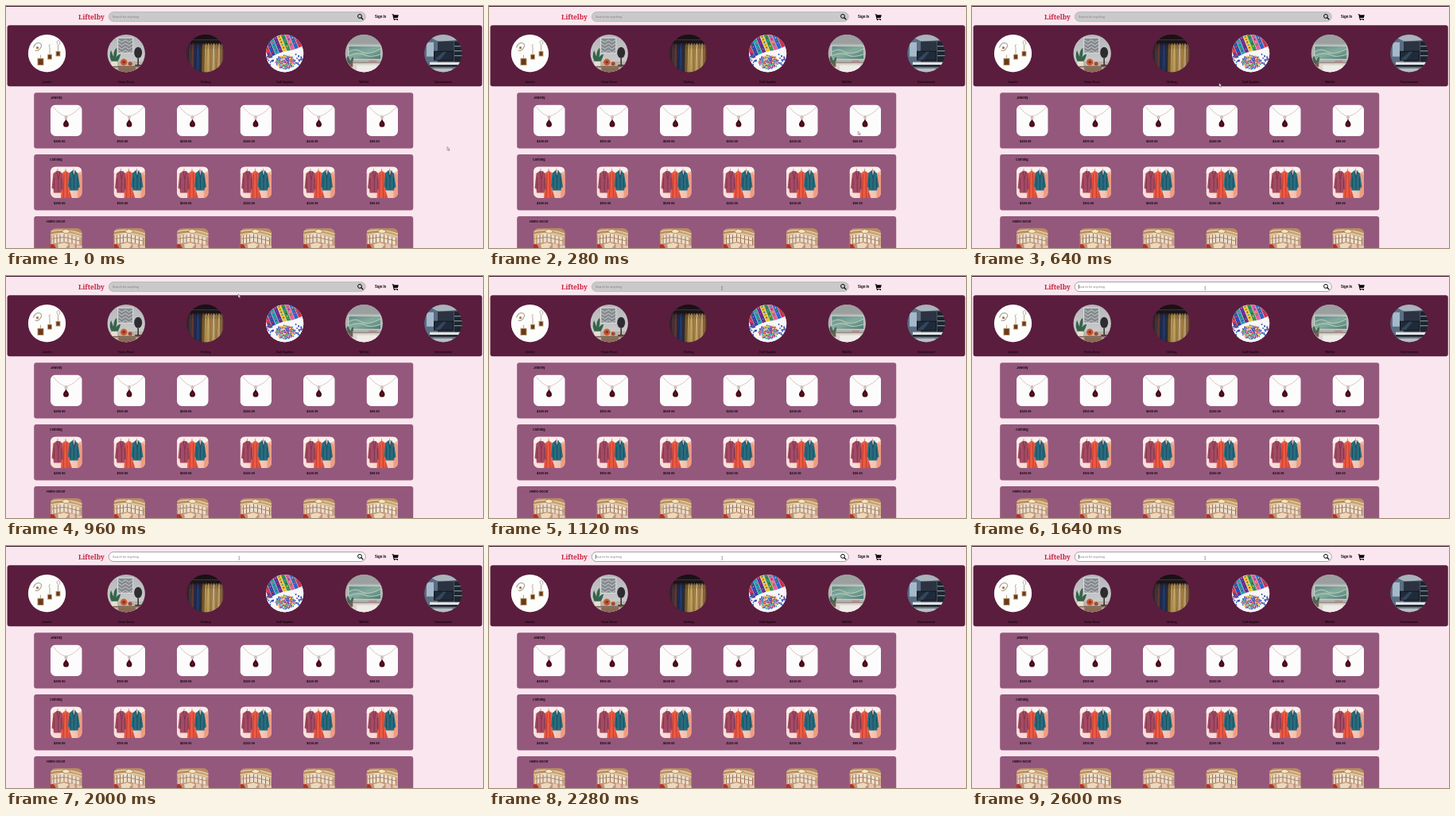
An HTML page for the animation above (2.68 s loop, 600 px wide and 305 px high).

```html
<!DOCTYPE html>
<html lang="en">
<head>
<meta charset="utf-8">
<title>Shop page</title>
<style>
html, body { margin: 0; width: 100%; height: 100%; overflow: hidden; background: #f9e6ee; }
svg { display: block; width: 600px; height: 305px; }
text { font-family: Inter, "Open Sans", sans-serif; }
.b { font-weight: 700; }
</style>
</head>
<body>
<svg id="stage" viewBox="0 0 600 305" xmlns="http://www.w3.org/2000/svg">
  <defs>
    <clipPath id="disc"><circle r="23.7"/></clipPath>
    <clipPath id="card"><rect width="39.5" height="39.5" rx="6.5"/></clipPath>
    <linearGradient id="wall" x2="0" y2="1"><stop stop-color="#b4b6ba"/><stop offset="1" stop-color="#d3d1cf"/></linearGradient>
    <linearGradient id="sea" x2="1" y2="1"><stop stop-color="#5f8984"/><stop offset=".5" stop-color="#86ab9f"/><stop offset="1" stop-color="#47786f"/></linearGradient>
    <linearGradient id="shade" x2="0" y2="1"><stop stop-color="#120c10" stop-opacity=".8"/><stop offset=".4" stop-color="#120c10" stop-opacity=".1"/><stop offset="1" stop-color="#120c10" stop-opacity=".2"/></linearGradient>
    <linearGradient id="peach"><stop stop-color="#f8e2de"/><stop offset=".6" stop-color="#f5cfc3"/><stop offset="1" stop-color="#f1b39c"/></linearGradient>

    <g id="necklace">
      <rect width="40" height="40" fill="#fdfcfd"/>
      <path d="M3.500 2.500Q11 12.500 19.500 14.800Q30 12 38 2" fill="none" stroke="#d0aaa2" stroke-width=".7"/>
      <path d="M19.500 13.500l1.800 2.500-1.800 3-1.800-3z" fill="#d3c6ca" stroke="#9c858a" stroke-width=".4"/>
      <path d="M19.500 18C20.400 20.400 23 22 23 24.700A3.500 3.400 0 0 1 16 24.700C16 22 18.600 20.400 19.500 18Z" fill="#430817"/>
      <path d="M18 24.500l1.500-2.500 1.300 2.500-1.300 1.500z" fill="#6b1529"/>
    </g>

    <g id="clothes">
      <rect width="40" height="40" fill="url(#peach)"/>
      <path d="M0 0H40V5L34 8 29 4 24 8 19 4 14 8 9 4 3 8H0z" fill="#faf0ee"/>
      <path d="M9 6V2.500M19 6V2.500M29 6V2.500" stroke="#8a7478" stroke-width=".6"/>
      <path d="M35 8l5 3v29h-6z" fill="#ef9c80"/>
      <path d="M15 8l4-3 4.500 3 .5 32H13z" fill="#ea5a42"/>
      <path d="M17 10l-1 30M20.500 8l.5 32" stroke="#c23a2d" stroke-width="1"/>
      <path d="M3.500 8.500l4.500-3 3 .2 4 3 1 20-2 1-.5 3.500H4l-.5-5-2-1z" fill="#a44b64"/>
      <path d="M8 5.500l1.800 11L12 6M9.800 17v15M4.500 14v14M14 14v14" fill="none" stroke="#74304a" stroke-width=".8"/>
      <path d="M23.500 8l4-3h3l4 3.500 2.500 17-2 1.500-.5 3H24l-.5-4-1.500-1z" fill="#286c7e"/>
      <path d="M27.500 5l2 9 2-9M29.500 14v15M25 13v14M34 13v14" fill="none" stroke="#174a5c" stroke-width=".9"/>
      <path d="M28 5h3l-1.500 6z" fill="#dcb0a6"/>
      <path d="M24 30l3 10h-5z" fill="#d84f3b"/>
    </g>

    <g id="room">
      <rect width="40" height="40" fill="#c9a47a"/>
      <path d="M0 3L8 0H40V7L24 4 0 9z" fill="#b98d5f"/>
      <path d="M0 4Q18-1 40 7M0 8Q18 3 40 11" fill="none" stroke="#ead6b0" stroke-width="1.200"/>
      <path d="M2 9l14-3 22 6v9L18 17 2 20z" fill="#eadfce"/>
      <path d="M4 9v11M8 8v11M12 8v10M17 7v10M22 8v10M27 9v10M32 11v9M37 12v9" stroke="#9a6f50" stroke-width="1"/>
      <path d="M2 13l15-2 21 5" fill="none" stroke="#b78462" stroke-width="1"/>
      <path d="M14 3l5-2 6 2-3 3h-5z" fill="#f7e6ba" stroke="#8f623f" stroke-width=".6"/>
      <path d="M0 20l17-3 23 5v18H0z" fill="#c39272"/>
      <path d="M0 20h4l3 5H0z" fill="#b52f2d"/>
      <path d="M9 20l8-2 6 2-4 5h-9z" fill="#ecd9bd"/>
      <path d="M24 19l6 1 1 5h-7zM33 21l7 1v3h-7z" fill="#e5c5b4"/>
    </g>

    <g id="arrow"><path d="M0 0V4.200L1.100 3.300 1.900 5 2.700 4.600 1.900 3H3.200z" fill="#fff" stroke="#4b4046" stroke-width=".45"/></g>
    <g id="beam"><path d="M-.9-2.100Q0-2.100 0-1.500Q0-2.100 .9-2.100M0-1.500V1.500M-.9 2.100Q0 2.100 0 1.500Q0 2.100 .9 2.100" fill="none" stroke="#5a565a" stroke-width=".5"/></g>
  </defs>

  <rect width="600" height="305" fill="#f9e6ee"/>
  <rect width="600" height="1" fill="#3a1a2a"/>
  <text x="91" y="16.900" font-size="8.300" fill="#c6223f" class="b" style="font-family:'Noto Serif',serif">Liftelby</text>
  <rect id="box" x="129.250" y="7.600" width="323" height="11.900" rx="5.950" stroke-width=".6"/>
  <text x="134" y="14.900" font-size="3.550" fill="#7d7d7d">Search for anything</text>
  <path id="caret" d="M134.200 10.800v5.600" stroke="#222" stroke-width=".6"/>
  <g fill="none" stroke="#080608">
    <circle cx="445" cy="12.900" r="2.450" stroke-width="1"/>
    <path d="M446.900 14.800l2.100 2.100" stroke-width="1.300" stroke-linecap="round"/>
  </g>
  <text x="464" y="15.300" font-size="4.300" class="b" fill="#0b0709">Sign In</text>
  <g fill="#080608">
    <path d="M485.600 10.200h1.900l.3 1h6l-1 3.900h-4.600l.2.800h4.200v.8h-5.100l-1.200-5.600h-.7z"/>
    <circle cx="488.700" cy="17.200" r=".85"/><circle cx="492.200" cy="17.200" r=".85"/>
  </g>
  <rect x="1.600" y="24.200" width="597.200" height="77" rx="3" fill="#5a1d3e"/>
  <g id="page"></g>
  <use id="pointer"/>
</svg>
<script>
const $ = id => document.getElementById(id);
const rect = (x, y, w, h, fill) => `<rect x="${x}" y="${y}" width="${w}" height="${h}" fill="${fill}"/>`;
const dot = (x, y, r, fill) => `<circle cx="${x}" cy="${y}" r="${r}" fill="${fill}"/>`;
const path = (d, fill, line = 'none', w = 1) =>
  `<path d="${d}" fill="${fill}" stroke="${line}" stroke-width="${w}"/>`;
const label = (x, y, size, str, anchor = 'start') =>
  `<text x="${x}" y="${y}" font-size="${size}" class="b" text-anchor="${anchor}" fill="#12070d">${str}</text>`;

let seed = 11;
const rnd = () => (seed = seed * 16807 % 2147483647) / 2147483647;

// Round pictures, drawn around their centre
function jewels() {
  const gem = (x, y, s) => rect(x - s, y - s, 2 * s, 2.300 * s, '#b8996c') + rect(x - s + .9, y - s + .9, 2 * s - 1.800, 2.300 * s - 1.800, '#6b3a1c');
  const drop = (x, y, s) => path(`M${x} ${y - 11}v8`, 'none', '#b8a58c', 1) + gem(x, y, s);
  return rect(-24, -24, 48, 48, '#fdfdfc') +
    path('M-17-7q2-7 7-6t2 6-7 3', 'none', '#aba7a2', 1.200) + dot(-12, -7, 1.600, '#a5763f') +
    gem(-8, 10, 4) + path('M-8 6V2', 'none', '#b8a58c', 1) +
    drop(3.500, 4, 2.900) + drop(14, 0, 2.900) +
    path('M3.500-7q-2-4 1-4M14-11q-3-4 0-5t2 5', 'none', '#a9a5a0', .9);
}
function decor() {
  let s = rect(-24, -24, 48, 48, 'url(#wall)') + rect(-11, -20, 20, 20, '#e0e0df') + rect(-10, -19, 18, 18, '#858a8f');
  for (let i = 0; i < 4; i++) s += path(`M-10 ${-17 + 4.300 * i}l4.500 3 4.500-3 4.500 3 4.500-3`, 'none', '#c9cbcc', 1);
  return s + rect(-24, 10, 48, 14, '#bdb2a8') + rect(-24, 16, 48, 1.500, '#77604f') +
    '<ellipse cx="15" cy="-1" rx="5" ry="7" fill="#2d2c31"/>' + path('M15 6v9M11 15h8', 'none', '#2d2c31', 1.500) +
    path('M-17 13q-6-10-2-17 2 6 3 8 0-8 4-11 1 7-1 12 3-4 6-4-2 8-6 12z', '#35644a') +
    rect(-19, 10, 8, 6, '#e6ded4') + dot(-3, 11, 4.200, '#c8592f') + dot(-3, 11, 1.800, '#8d2f23') +
    dot(5, 13, 2.500, '#a34a32') + rect(-10, 17.500, 22, 7, '#8a6a54');
}
function rail() {
  const tones = ['#3a2a2e', '#4c3640', '#6b3f36', '#1f2f5c', '#24407a', '#2c2f3c', '#86662f', '#caa55a',
    '#d8b76c', '#b98d45', '#d9c08a', '#b98a44', '#d2b078', '#9a6a44', '#5a3a2e'];
  let s = rect(-24, -24, 48, 48, '#231a1e');
  tones.forEach((c, i) => {
    const x = -24 + i * 3.300;
    s += path(`M${x} -10q1.600-6 3.300 0l1 34h-5z`, c) + path(`M${x + 3} -8l.7 32`, 'none', '#1a1214', .5);
  });
  return s + path('M-24-17H24', 'none', '#8f8178', .8) + rect(-24, -24, 48, 48, 'url(#shade)');
}
function crafts() {
  const tones = ['#d42e49', '#3043a8', '#26a0a8', '#6b2b8d', '#eec33a', '#35944e', '#e2609a', '#2a65c4'];
  let s = rect(-24, -24, 48, 48, '#f8f6f8') + '<g transform="rotate(-22)">';
  for (let i = 0; i < 9; i++) {
    s += rect(-21 + i * 5, -25, 4.600, 25, tones[i % 8]);
    for (let j = 0; j < 6; j++) s += dot(-18.700 + i * 5, -22 + j * 3.700, .9, tones[(i + j + 3) % 8]);
  }
  s += '</g>' + path('M-24 9Q-4-6 24-5V24H-24z', '#f8f6f8');
  for (let i = 0; i < 110; i++) {
    const a = i * 2.400, r = Math.sqrt(i / 110) * 11;
    s += dot((1 + r * 1.150 * Math.cos(a)).toFixed(1), (11 + r * .8 * Math.sin(a)).toFixed(1), .95, tones[Math.floor(rnd() * 8)]);
  }
  for (let i = 0; i < 44; i++) {
    const side = i % 2 ? 1 : -1;
    s += dot((side * (14 + rnd() * 9)).toFixed(1), (1 + rnd() * 14).toFixed(1), .9, tones[i % 3 ? 1 : 7]);
  }
  return s;
}
function art() {
  let s = rect(-24, -24, 48, 48, '#b0b1af') + rect(-24, -24, 48, 12, '#9c9f9f') + rect(-20, -10, 42, 18, '#d5d7d1') +
    rect(-19, -9, 40, 16, 'url(#sea)') + path('M-19-2q8-5 16 0t24-4M-19 3q12-5 20-1t20-1', 'none', '#afc8b7', 1.200);
  s += rect(-24, 12, 48, 12, '#dad6d0') + rect(-24, 11, 48, 1.500, '#958c84');
  return s + path('M-19 14q-5-8-1-11 2 5 3 6 2-5 4-4 0 5-3 9z', '#4a6653') + rect(-18, 12, 4, 5, '#7a5c4e') +
    rect(6, 9, 10, 3, '#b7898d') + rect(-9, 15, 25, 9, '#efece7');
}
function media() {
  return rect(-24, -24, 48, 48, '#465163') + rect(-24, -24, 17, 48, '#5b6d82') + rect(-21, -14, 9, 18, '#a5b9cb') +
    path('M-24-24H24V-17L-6-15z', '#aab2bb') + rect(-7, -15, 20, 27, '#2b3342') +
    rect(-12, -3, 25, 12, '#10161e') + rect(-11, -2, 23, 10, '#1f2b3a') + path('M-11 8l11-10h4l-8 10z', '#34475c') +
    rect(14, -15, 10, 28, '#1d242e') + path('M14-9h10M14-3h10M14 3h10', 'none', '#a8b3bb', .9) +
    rect(-17, 11, 38, 4, '#dfe3e6') + rect(-17, 14.500, 38, 2.500, '#161c24') + rect(-24, 17, 48, 7, '#6d7681') +
    path('M-20 24l7-5h24l6 5z', '#b9bec3');
}

const groups = [['Jewelry', jewels], ['Home-Decor', decor], ['Clothing', rail],
  ['Craft Supplies', crafts], ['Wall Art', art], ['Entertainment', media]];
const prices = ['$499.99', '$199.99', '$699.99', '$249.99', '$449.99', '$99.99'];
const panels = [['Jewelry', 56, 'necklace'], ['Clothing', 55, 'clothes'], ['Home-Decor', 51, 'room']];

let html = '';
groups.forEach(([name, draw], i) => {
  const x = 51.500 + i * 99.700;
  html += `<g transform="translate(${x} 59.700)"><g clip-path="url(#disc)">${draw()}</g></g>` +
    label(x, 96.600, 3.150, name, 'middle');
});
panels.forEach(([name, tx, id], row) => {
  const y = 109.200 + row * 77.900;
  html += `<rect x="35.200" y="${y}" width="477" height="70.400" rx="3" fill="#94587c"/>` + label(tx, y + 7.900, 3.750, name);
  prices.forEach((p, i) => {
    const x = 56 + i * 79.500;
    html += `<g transform="translate(${x} ${y + 15.300})"><g clip-path="url(#card)"><use href="#${id}"/></g></g>` +
      label(x + 4, y + 63.100, 3.450, p);
  });
});
$('page').innerHTML = html;

// Pointer path: time, x, y, velocity x, velocity y
const keys = [[0, 555, 177.500, 0, 0], [640, 311, 97.500, -.13, -.19], [960, 292, 23, -.01, -.11], [1160, 293.300, 15.200, 0, 0]];
const LOOP = 2680, FOCUS = 1280, FADE = 200;

function hermite(p, v, q, w, u, d) {
  const u2 = u * u, u3 = u2 * u;
  return (2 * u3 - 3 * u2 + 1) * p + (u3 - 2 * u2 + u) * d * v + (3 * u2 - 2 * u3) * q + (u3 - u2) * d * w;
}
function pointerAt(t) {
  const end = keys[keys.length - 1];
  if (t >= end[0]) return [end[1], end[2]];
  const i = keys.findIndex(k => k[0] > t), a = keys[i - 1], b = keys[i];
  const d = b[0] - a[0], u = (t - a[0]) / d;
  return [1, 2].map(n => hermite(a[n], a[n + 2], b[n], b[n + 2], u, d));
}
function render(t) {
  const [x, y] = pointerAt(t), focused = t >= FOCUS;
  const c = Math.round(201 + 54 * Math.min(1, Math.max(0, (t - FOCUS + 50) / FADE)));
  $('box').setAttribute('fill', `rgb(${c},${c},${c})`);
  $('box').setAttribute('stroke', focused ? '#6b676d' : '#a9a4a8');
  $('caret').setAttribute('visibility', focused && (t - FOCUS) % 1000 < 500 ? 'visible' : 'hidden');
  $('pointer').setAttribute('href', y < 19.500 ? '#beam' : '#arrow');
  $('pointer').setAttribute('transform', `translate(${x.toFixed(2)} ${y.toFixed(2)})`);
}
const start = performance.now();
function tick() {
  render((performance.now() - start) % LOOP);
  requestAnimationFrame(tick);
}
render(0);
requestAnimationFrame(tick);
</script>
</body>
</html>
```
